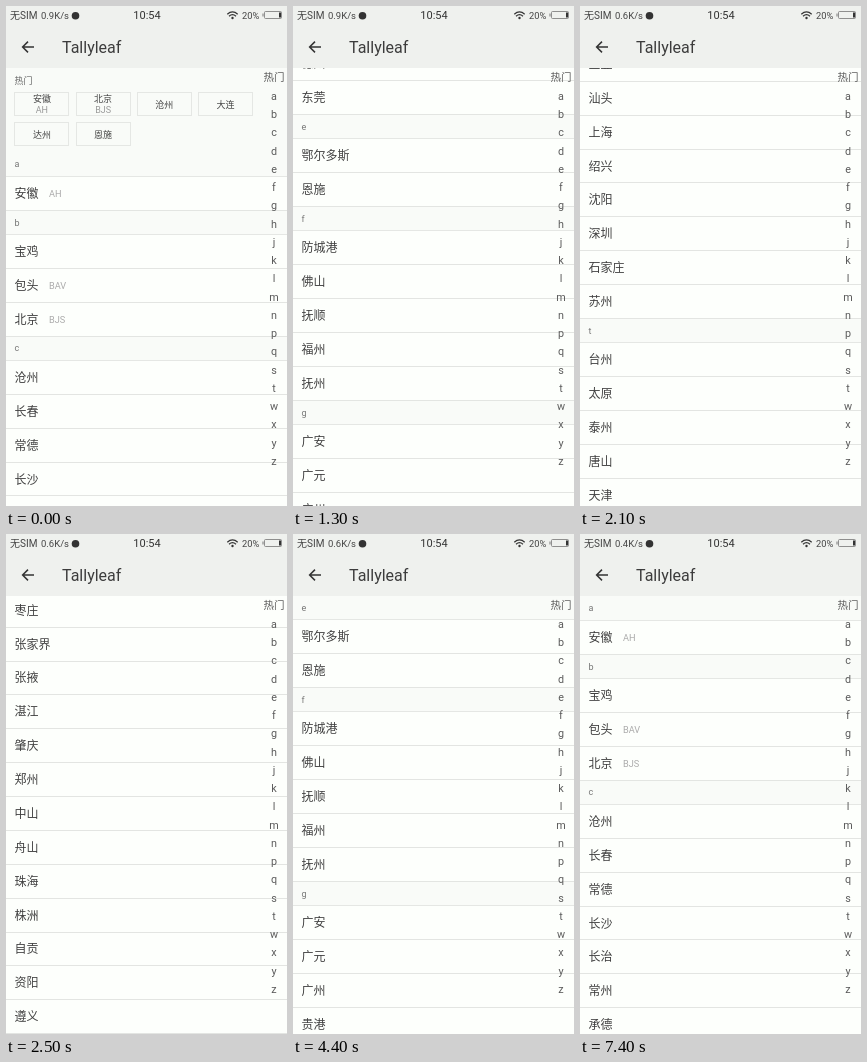
Write an HTML page that moves like this. It is 281 px wide and 500 px high and loops after 8000 ms.

```html
<!DOCTYPE html>
<html lang="zh-CN">
<head>
<meta charset="utf-8">
<title>Tallyleaf</title>
<style>
  html, body { margin: 0; width: 100%; height: 100%; overflow: hidden; background: #fdfffc; }
  body { position: relative; font-family: Roboto, "Noto Sans CJK SC", "Noto Sans CJK", sans-serif; }
  #view { position: absolute; left: 0; right: 0; top: 62px; bottom: 0; overflow: hidden; }
  #list { position: absolute; left: 0; right: 0; top: 0; }
  #bar { position: absolute; left: 0; top: 0; width: 100%; height: 62px; background: #eff1ee; }
  #bar svg { position: absolute; left: 0; top: 0; }
  .row, .sec, .hot { position: absolute; left: 0; right: 0; box-sizing: border-box; }
  .row { border-bottom: 1px solid #e3e5e2; }
  .sec { background: #f9fbf8; border-bottom: 1px solid #e5e7e4; }
  .hot { background: #f9fbf8; }
  .btn { position: absolute; width: 55px; height: 24px; box-sizing: border-box; border: 1px solid #e5e7e4; }
  .t { position: absolute; white-space: pre; line-height: 16px; margin-top: -8px; }
  .mid { transform: translateX(-50%); }
</style>
</head>
<body>
<div id="view"><div id="list"></div></div>
<div id="index"></div>
<div id="bar">
  <svg width="281" height="62" fill="none" stroke="#333">
    <path d="M28 41H16.8M22 35.6L16.6 41L22 46.4" stroke-width="1.5"/>
    <circle cx="69.5" cy="9.7" r="3.8" fill="#333" stroke="none"/>
    <path d="M221.3 8.2Q226.5 3.6 231.7 8.2M223 10.2Q226.5 7 230 10.2" stroke-width="1.2"/>
    <circle cx="226.5" cy="12" r="1.2" fill="#333" stroke="none"/>
    <rect x="258.5" y="5.5" width="17" height="7" rx="1" stroke="#777" stroke-width=".8"/>
    <path d="M257 7.5V10.5" stroke="#777"/>
    <path d="M274 6.5V11.5" stroke-width="2"/>
  </svg>
</div>
<script>
const $ = id => document.getElementById(id);
const ROW = 33.87, SEC = 24.33, HOT = 84.5, TOP = 62, LOOP = 8000;

const cities = {
  a: '安徽:AH',
  b: '宝鸡 包头:BAV 北京:BJS',
  c: '沧州 长春 常德 长沙 长治 常州 承德 成都 重庆 滁州',
  d: '大连 达州 丹东 大庆 大同 德阳 德州 东莞',
  e: '鄂尔多斯 恩施',
  f: '防城港 佛山 抚顺 福州 抚州',
  g: '广安 广元 广州 贵港 桂林 贵阳',
  h: '哈尔滨 海口 邯郸 杭州 汉中 合肥 衡水 衡阳 菏泽 淮安 惠州 湖州',
  j: '吉安 江门 嘉兴 金华 济南 济宁 九江',
  k: '开封 昆明',
  l: '兰州 乐山 聊城 丽江 临汾 丽水 柳州 洛阳 泸州',
  m: '眉山 梅州 绵阳',
  n: '南昌 南充 南京 南宁 南通 南阳 宁波',
  p: '攀枝花 平顶山 莆田',
  q: '青岛 清远 秦皇岛 泉州 衢州',
  s: '三亚 汕头 上海 绍兴 沈阳 深圳 石家庄 苏州',
  t: '台州 太原 泰州 唐山 天津',
  w: '潍坊 威海 温州 武汉 芜湖 无锡',
  x: '厦门 西安 襄阳 咸阳 西宁 徐州',
  y: '延安 盐城 扬州 烟台 宜宾 宜昌 银川 鹰潭 永州 岳阳 榆林 运城',
  z: '枣庄 张家界 张掖 湛江 肇庆 郑州 中山 舟山 珠海 株洲 自贡 资阳 遵义'
};

function box(parent, cls, top, height) {
  const el = document.createElement('div');
  el.className = cls;
  el.style.top = top + 'px';
  if (height) el.style.height = height + 'px';
  return parent.appendChild(el);
}

// y is the vertical centre of the line
function text(parent, str, x, y, size, color, mid) {
  const el = box(parent, mid ? 't mid' : 't', y);
  el.style.left = x + 'px';
  el.style.fontSize = size + 'px';
  el.style.color = color;
  el.textContent = str;
  return el;
}

const bar = $('bar'), list = $('list'), side = $('index');
text(bar, '无SIM', 4, 9.7, 10, '#444');
const rate = text(bar, '', 35, 9.7, 9.5, '#444');
text(bar, '10:54', 141, 9.8, 11, '#333', true);
text(bar, '20%', 236, 9.8, 9.3, '#444');
text(bar, 'Tallyleaf', 56, 41.5, 16, '#3c3c3c');

const hot = box(list, 'hot', 0, HOT + 1);
text(hot, '热门', 8.5, 12.6, 9, '#666');
['安徽:AH', '北京:BJS', '沧州', '大连', '达州', '恩施'].forEach((item, i) => {
  const [name, code] = item.split(':');
  const btn = box(hot, 'btn', i < 4 ? 24 : 54);
  btn.style.left = 8.4 + i % 4 * 61.2 + 'px';
  text(btn, name, 26.5, code ? 6 : 11.5, 9, '#444', true);
  if (code) text(btn, code, 26.5, 17, 9, '#999', true);
});

const start = {};
let y = HOT;
for (const key in cities) {
  start[key] = y;
  text(box(list, 'sec', y, SEC), key, 8.5, SEC / 2 - .3, 9, '#777');
  y += SEC;
  for (const item of cities[key].split(' ')) {
    const [name, code] = item.split(':');
    const row = box(list, 'row', y, ROW);
    text(row, name, 8.5, ROW / 2, 12, '#404040');
    if (code) text(row, code, 43, ROW / 2, 9.2, '#aaa');
    y += ROW;
  }
}

text(side, '热门', 268, 72, 10.5, '#5c5c5c', true);
Object.keys(cities).forEach((key, i) =>
  text(side, key, 268, 90.8 + i * 18.25, 10.8, '#5c5c5c', true));

// scroll offset that puts the centre of a section header at height cy
const at = (key, cy) => start[key] + TOP + SEC / 2 - cy;
const jump = key => start[key];
const line = p => p, hold = () => 0;
const easeIn = p => p ** 1.25, easeOut = p => 1 - (1 - p) ** 2;

const end = at('z', 47.9), rest = at('y', 68) - 170;
// time, offset, easing towards the next step
const moves = [
  [0, 0, hold],
  [900, 0, easeIn],
  [1300, at('e', 121), line],
  [1800, at('m', 341), line],
  [2500, end, hold],
  [3200, end, line],
  [3500, at('y', 68), easeOut],
  [3800, rest, hold],
  [4400, jump('e'), hold],
  [5400, 0, hold],
  [6400, jump('a'), hold],
  [LOOP, jump('a'), hold]
];
const rates = [[0, '0.9'], [1900, '0.6'], [5200, '0.4']];

function offset(t) {
  const i = moves.findIndex(m => m[0] > t) - 1;
  const [t0, a, ease] = moves[i], [t1, b] = moves[i + 1];
  return a + (b - a) * ease((t - t0) / (t1 - t0));
}

// whole pixels keep the row lines sharp
function draw(now) {
  const t = Math.floor(now % LOOP / 100) * 100;
  list.style.top = Math.round(-offset(t)) + 'px';
  rate.textContent = rates.filter(r => r[0] <= t).pop()[1] + 'K/s';
}

const t0 = performance.now();
function tick() {
  draw(performance.now() - t0);
  requestAnimationFrame(tick);
}
tick();
</script>
</body>
</html>
```
